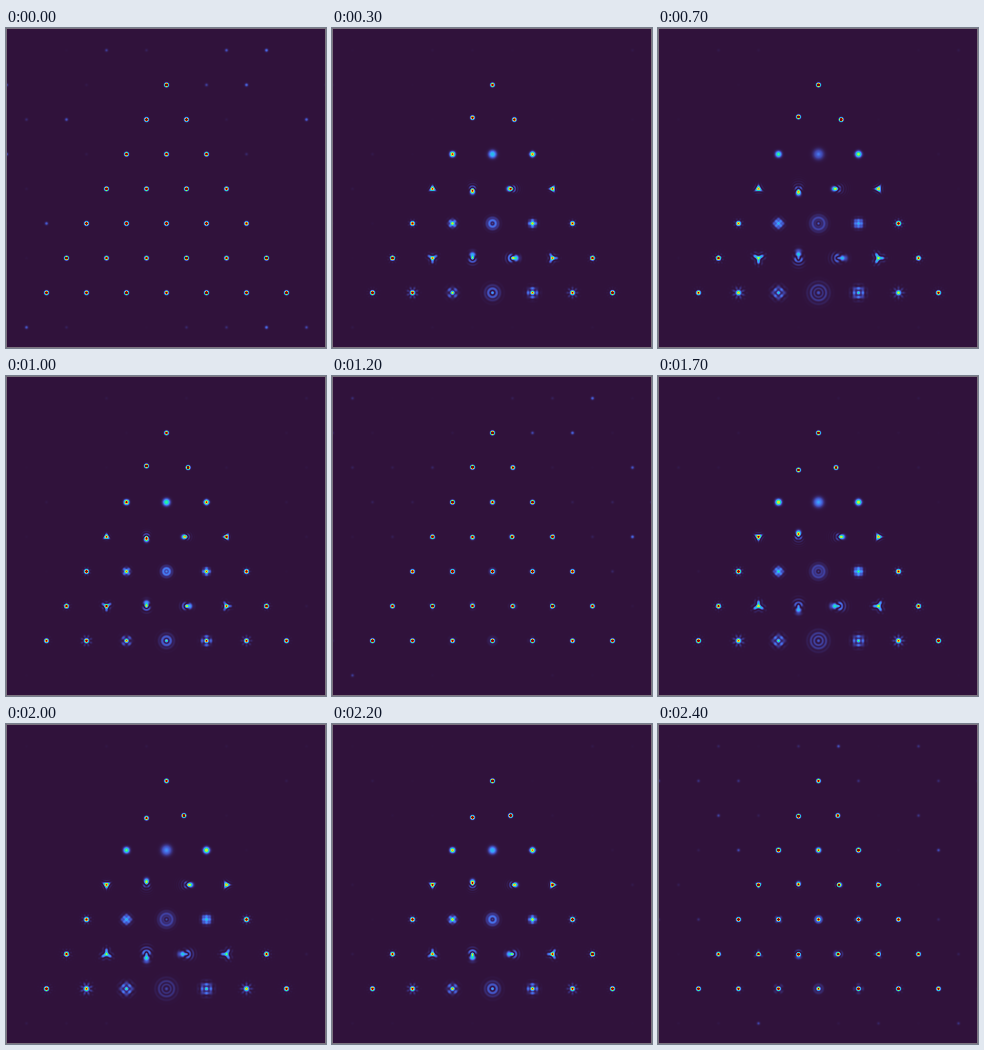
Write an HTML page with a canvas that moves like this. It is 320 px wide and 320 px high and loops after 2.5 s.

```html
<!DOCTYPE html>
<html lang="en">
<head>
<meta charset="utf-8">
<title>Zernike point spread functions</title>
<style>
html, body { margin: 0; width: 100%; height: 100%; overflow: hidden; background: #30123b; }
canvas { display: block; width: 320px; height: 320px; }
</style>
</head>
<body>
<canvas id="stage" width="320" height="320"></canvas>
<script>
const SIZE = 320, STEPS = 25, STEP_MS = 100;
const GRID = 32;          // pupil samples per axis
const REACH = 16;         // half width of a spot's patch in pixels
const WAIST = 0.58;       // Gaussian beam radius relative to the pupil
const Q_PER_PX = 1.72;    // spatial frequency per pixel
const STRENGTH = 4.7;     // largest phase coefficient in radians
const SATURATION = 0.6;   // intensity shown with the last colour
const ROW_GAP = 34.64, TOP = 56.4, MIDDLE = 160;

const palette = ('30123b 4145ab 4675ed 39a2fc 1bcfd4 24eca6 61fc6c a4fc3b ' +
  'd1e834 f3c63a fe9b2d f36315 d93806 b11901 7a0402').split(' ')
  .map(hex => [0, 2, 4].map(i => parseInt(hex.slice(i, i + 2), 16)));

const ctx = document.getElementById('stage').getContext('2d');
const image = ctx.createImageData(SIZE, SIZE);
const field = new Float32Array(SIZE * SIZE);

const factorial = n => n < 2 ? 1 : n * factorial(n - 1);

function hash(a, b) {
  const v = Math.sin(a * 127.1 + b * 311.7 + 7.3) * 43758.5453;
  return v - Math.floor(v);
}

function zernike(n, m, r, angle) {
  const am = Math.abs(m);
  let radial = 0;
  for (let k = 0; k <= (n - am) / 2; k++) {
    radial += (k % 2 ? -1 : 1) * factorial(n - k) * r ** (n - 2 * k) /
      (factorial(k) * factorial((n + am) / 2 - k) * factorial((n - am) / 2 - k));
  }
  return radial * (m < 0 ? Math.sin(am * angle) : Math.cos(am * angle));
}

const axis = Array.from({ length: GRID }, (_, i) => (i + .5) * 2 / GRID - 1);
const pupil = [];
axis.forEach((y, row) => axis.forEach((x, col) => {
  const r = Math.hypot(x, y);
  if (r <= 1) pupil.push({ at: row * GRID + col, r, angle: Math.atan2(y, x), weight: Math.exp(-r * r / WAIST ** 2) });
}));
const peak = pupil.reduce((sum, s) => sum + s.weight, 0) ** 2;

// Pixels around a centre with their Fourier factors for every pupil sample
function kernel(centre, direction) {
  const pixels = [];
  for (let p = Math.round(centre) - REACH; p <= Math.round(centre) + REACH; p++) {
    if (p < 0 || p >= SIZE) continue;
    const q = (p - centre) * Q_PER_PX * direction;
    pixels.push({ p, cos: axis.map(u => Math.cos(q * u)), sin: axis.map(u => -Math.sin(q * u)) });
  }
  return pixels;
}

function makeSpot(n, m, x, y) {
  return {
    phase: pupil.map(s => zernike(n, m, s.r, s.angle)),
    across: kernel(x, 1),
    down: kernel(y, -1)
  };
}

const spots = [], ghosts = [];
for (let row = -1; row <= 7; row++) {
  const y = TOP + row * ROW_GAP;
  for (let m = -8; m <= 8; m++) {
    if ((m + row) % 2) continue;
    const x = MIDDLE + m * 20;
    if (row >= 0 && row < 7 && Math.abs(m) <= row) spots.push(makeSpot(row, m, x, y));
    else ghosts.push({ x, y });
  }
}

function addSpot(spot, amplitude, gain) {
  const re = new Float32Array(GRID * GRID), im = new Float32Array(GRID * GRID);
  pupil.forEach((s, i) => {
    re[s.at] = s.weight * Math.cos(amplitude * spot.phase[i]);
    im[s.at] = s.weight * Math.sin(amplitude * spot.phase[i]);
  });
  const lineRe = new Float32Array(GRID), lineIm = new Float32Array(GRID);
  for (const h of spot.across) {
    for (let row = 0; row < GRID; row++) {
      let a = 0, b = 0;
      for (let col = 0; col < GRID; col++) {
        const at = row * GRID + col;
        a += re[at] * h.cos[col] - im[at] * h.sin[col];
        b += re[at] * h.sin[col] + im[at] * h.cos[col];
      }
      lineRe[row] = a;
      lineIm[row] = b;
    }
    for (const v of spot.down) {
      let a = 0, b = 0;
      for (let row = 0; row < GRID; row++) {
        a += lineRe[row] * v.cos[row] - lineIm[row] * v.sin[row];
        b += lineRe[row] * v.sin[row] + lineIm[row] * v.cos[row];
      }
      field[v.p * SIZE + h.p] += (a * a + b * b) * gain / peak;
    }
  }
}

function addGhost({ x, y }, strength) {
  const cx = Math.round(x), cy = Math.round(y);
  for (let py = cy - 3; py <= cy + 3; py++) {
    for (let px = cx - 3; px <= cx + 3; px++) {
      if (px < 0 || py < 0 || px >= SIZE || py >= SIZE) continue;
      field[py * SIZE + px] += strength * Math.exp(-((px - x) ** 2 + (py - y) ** 2) / 2);
    }
  }
}

function paint() {
  const last = palette.length - 1;
  for (let i = 0; i < field.length; i++) {
    const level = Math.min(1, field[i] / SATURATION) * last;
    const low = Math.min(last - 1, Math.floor(level)), mix = level - low;
    for (let c = 0; c < 3; c++) {
      image.data[i * 4 + c] = palette[low][c] * (1 - mix) + palette[low + 1][c] * mix;
    }
    image.data[i * 4 + 3] = 255;
  }
  ctx.putImageData(image, 0, 0);
  ctx.strokeStyle = '#7c7480';
  ctx.lineWidth = 1;
  ctx.strokeRect(.5, .5, SIZE - 1, SIZE - 1);
}

function draw(step) {
  const swing = Math.sin(2 * Math.PI * step / STEPS);
  field.fill(0);
  spots.forEach((spot, i) => addSpot(spot, STRENGTH * swing, .75 + .4 * hash(i, step)));
  const ghostLevel = .1 * Math.max(.06, 1 - 1.6 * Math.abs(swing));
  ghosts.forEach((ghost, i) => addGhost(ghost, ghostLevel * hash(i + 50, step) ** 4));
  paint();
}

let shown = -1;
const start = performance.now();
function tick() {
  const step = Math.floor((performance.now() - start) / STEP_MS) % STEPS;
  if (step !== shown) draw(shown = step);
  requestAnimationFrame(tick);
}
tick();
</script>
</body>
</html>
```
